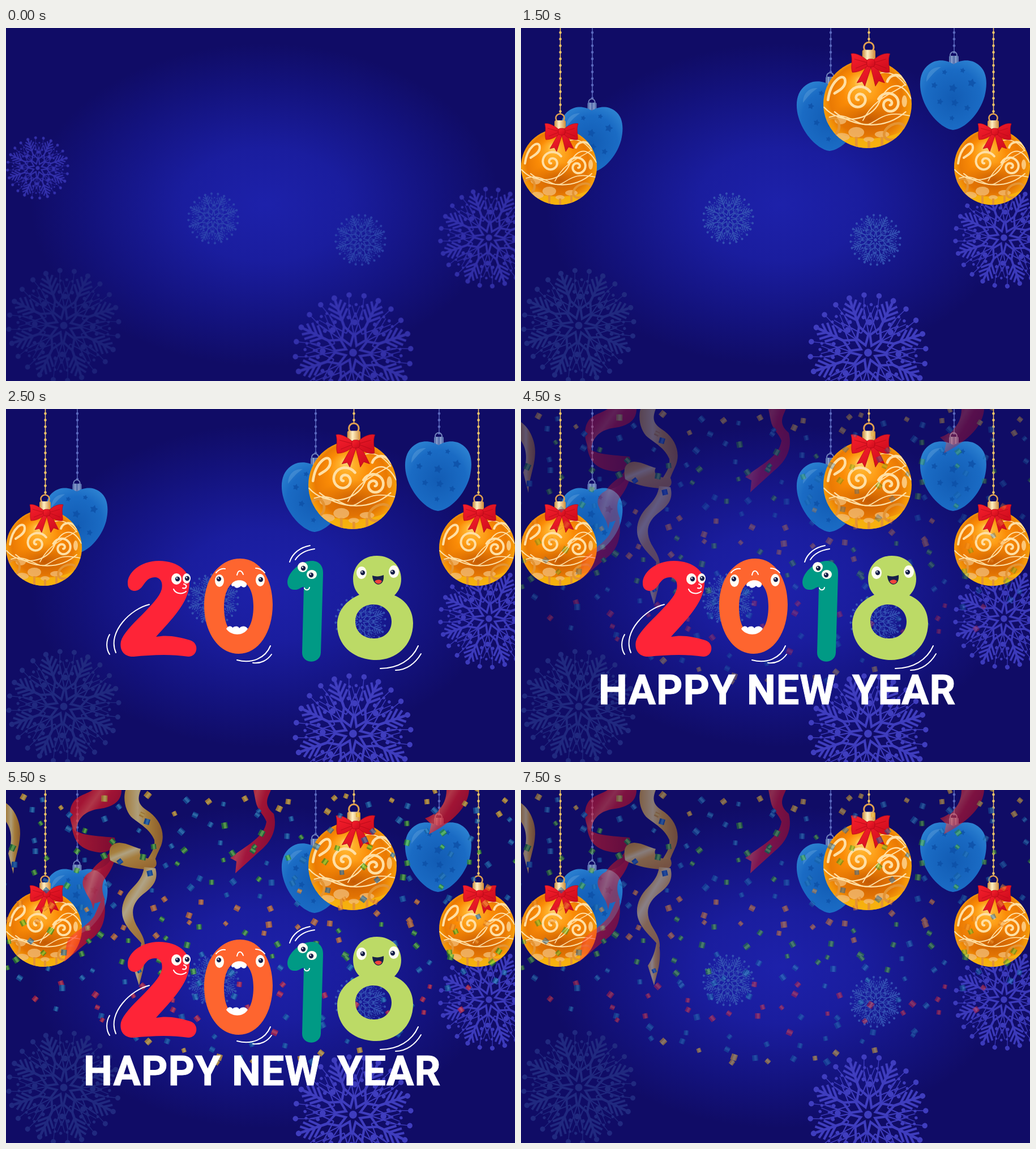
An HTML page for the animation above (8 s loop, 899 px wide and 623 px high).

```html
<!DOCTYPE html>
<html lang="en">
<head>
<meta charset="utf-8">
<title>Happy New Year</title>
<style>
  html, body { margin: 0; width: 100%; height: 100%; overflow: hidden; background: #100c64; }
  svg { display: block; width: 899px; height: 623px; }
  #greeting { font: 700 72px Roboto, sans-serif; letter-spacing: 1px; fill: #fff; stroke: #fff; }
  .line { fill: none; stroke: #fff; stroke-width: 2; stroke-linecap: round; }
  .red { fill: url(#red); }
  .redBack { fill: url(#redBack); }
  .gold { fill: url(#goldFoil); }
  .goldBack { fill: url(#goldBack); }
</style>
</head>
<body>
<svg viewBox="0 0 899 623">
  <defs>
    <radialGradient id="sky" gradientUnits="userSpaceOnUse" cx="0" cy="0" r="1" gradientTransform="translate(458 312) scale(415 285)">
      <stop stop-color="#1d21aa"/><stop offset=".35" stop-color="#1a1d9e"/>
      <stop offset=".75" stop-color="#13127c"/><stop offset="1" stop-color="#100c66"/>
    </radialGradient>
    <radialGradient id="ballFill" cx=".5" cy=".5" r=".52" fx=".42" fy=".22">
      <stop stop-color="#ffe08a"/><stop offset=".16" stop-color="#ffb02a"/>
      <stop offset=".45" stop-color="#fb8c06"/><stop offset=".78" stop-color="#ea7a04"/>
      <stop offset="1" stop-color="#f9a50c"/>
    </radialGradient>
    <radialGradient id="ballShade">
      <stop stop-color="#b44c00" stop-opacity=".75"/><stop offset="1" stop-color="#c85c00" stop-opacity="0"/>
    </radialGradient>
    <radialGradient id="heartFill" cx=".5" cy=".55" r=".6">
      <stop stop-color="#125cb4"/><stop offset=".7" stop-color="#1a6bc4"/><stop offset="1" stop-color="#2b80d0"/>
    </radialGradient>
    <linearGradient id="cap">
      <stop stop-color="#c98a3c"/><stop offset=".4" stop-color="#fff0c4"/><stop offset="1" stop-color="#d08a35"/>
    </linearGradient>
    <linearGradient id="bowFill" y2="1">
      <stop stop-color="#f8202c"/><stop offset="1" stop-color="#cc0a1c"/>
    </linearGradient>
    <linearGradient id="red" y2=".6">
      <stop stop-color="#d00c18"/><stop offset=".3" stop-color="#ee1a1c"/><stop offset=".45" stop-color="#ff4c3a"/>
      <stop offset=".6" stop-color="#ea181c"/><stop offset="1" stop-color="#c00a16"/>
    </linearGradient>
    <linearGradient id="redBack">
      <stop stop-color="#f0201c"/><stop offset="1" stop-color="#b40c18"/>
    </linearGradient>
    <linearGradient id="goldFoil" x2=".7" y2="1">
      <stop stop-color="#d8940e"/><stop offset=".3" stop-color="#f4bc2c"/><stop offset=".42" stop-color="#ffec8c"/>
      <stop offset=".6" stop-color="#f0b526"/><stop offset="1" stop-color="#d8940e"/>
    </linearGradient>
    <linearGradient id="goldBack">
      <stop stop-color="#eeb428"/><stop offset=".35" stop-color="#ffe884"/><stop offset=".6" stop-color="#f0b424"/>
      <stop offset="1" stop-color="#c8840e"/>
    </linearGradient>
    <clipPath id="round"><circle r="67"/></clipPath>

    <g id="arm" fill="currentColor" stroke="currentColor">
      <path d="M0-13L10-28L0-46L-10-28Z" fill="none" stroke-width="4"/>
      <path d="M0-44V-92" stroke-width="4.5"/>
      <path d="M-15-73L0-57L15-73M-15-83L0-67L15-83M-10-90L0-77L10-90" fill="none" stroke-width="4"/>
      <path d="M0-34L26-62M0-34L-26-62M11-27L17-70M-11-27L-17-70" stroke-width="2"/>
      <path d="M13-60L25-93M-13-60L-25-93M22-54L36-70M-22-54L-36-70" stroke-width="1.3"/>
      <g stroke="none">
        <circle cy="-96" r="4.7"/><circle cx="25" cy="-93" r="4.5"/><circle cx="-25" cy="-93" r="4.5"/>
        <circle cx="19" cy="-47" r="5"/><circle cx="12" cy="-58" r="3.2"/><circle cx="-12" cy="-58" r="3.2"/>
        <circle cx="31" cy="-74" r="2.6"/><circle cx="20" cy="-76" r="2.4"/><circle cx="-20" cy="-76" r="2.4"/>
      </g>
    </g>
    <g id="flake"><circle r="6.5" fill="currentColor"/></g>

    <g id="ball">
      <circle cx="2" cy="-86" r="7.5" fill="none" stroke="#e0a050" stroke-width="2.6"/>
      <rect x="-8" y="-82" width="20" height="20" rx="3" fill="url(#cap)"/>
      <circle r="67" fill="url(#ballFill)"/>
      <g clip-path="url(#round)">
        <ellipse cx="2" cy="24" rx="56" ry="32" fill="url(#ballShade)"/>
        <path d="M-62 36C-30 58 30 58 62 36L50 70H-50Z" fill="#f8b810" opacity=".8"/>
        <g fill="#f2bb72" opacity=".8">
          <ellipse cx="-41" cy="25" rx="9" ry="6"/><ellipse cx="-17" cy="43" rx="12" ry="8"/>
          <ellipse cx="-39" cy="50" rx="12" ry="6"/><ellipse cx="22" cy="46" rx="11" ry="5"/>
          <ellipse cx="2" cy="54" rx="8" ry="4"/>
        </g>
        <g fill="none" stroke="#e49433" stroke-width="4">
          <ellipse cx="41" cy="42" rx="17" ry="11" transform="rotate(-28 41 42)"/>
          <ellipse cx="-53" cy="34" rx="10" ry="13"/><path d="M-17 50V68M2 56V68M22 50V68"/>
        </g>
        <g id="swirls" fill="none" stroke="#ffdfa4" stroke-width="4" stroke-linecap="round">
          <path d="M-60-6C-56-36-36-48-34-36S-48-18-50-16M58-34C50-48 34-46 30-34"/>
          <path d="M-66 5C-40 34 6 25 18-3S50-38 66-8M-50 12C-24 34 24 42 58 12" stroke-width="2"/>
          <path d="M-7 25C12-12 44-18 58-30M-58 20C-28 10-12 38 4 30S28 10 64 18M14-44C30-54 48-42 58-28" stroke-width="1.6"/>
        </g>
        <ellipse cx="56" cy="-4" rx="4" ry="9" fill="#ffd895" opacity=".8"/>
      </g>
      <g fill="url(#bowFill)" stroke="#b30918" stroke-width=".7">
        <path d="M0-60L-16-32L-8-34L-4-27L6-58ZM4-60L12-27L17-35L26-32L12-60Z"/>
        <path d="M4-62C-8-74-20-78-25-76C-22-66-26-56-23-48C-12-48-2-54 4-62ZM5-62C14-74 28-78 34-76C30-66 34-56 33-48C22-46 10-54 5-62Z"/>
        <path d="M-20-68L2-62L-18-54M28-68L8-62L29-54" fill="none"/>
        <rect x="-1" y="-68" width="12" height="12" rx="4"/>
      </g>
    </g>

    <g id="heart">
      <circle cy="-13" r="6" fill="none" stroke="#7383bd" stroke-width="2"/>
      <rect x="-8" y="-12" width="17" height="15" rx="2" fill="#6079b4"/>
      <path d="M-3-12V2M4-12V2" stroke="#8fa3cf" stroke-width="2"/>
      <path d="M0 3C-12-5-30-7-43 3C-60 15-62 38-56 59C-47 91-20 117-1 119C20 117 46 91 55 59C60 38 60 15 43 3C30-7 12-5 0 3Z" fill="url(#heartFill)"/>
      <path d="M-48 34C-48 16-36 7-22 8C-34 16-40 24-48 34Z" fill="#6fabe0" opacity=".35"/>
      <g id="stars" fill="#0c4fa6" opacity=".75"></g>
    </g>
  </defs>

  <rect width="899" height="623" fill="url(#sky)"/>
  <g id="flakes"></g>
  <g id="ornaments"></g>

  <g id="party">
    <path class="redBack" d="M190 92C186 125 150 125 146 158C146 176 150 186 158 200L175 194C166 172 170 160 184 138C194 122 194 106 190 92Z"/>
    <path class="redBack" d="M116 62C122 80 150 80 192 84C196 98 184 112 163 110C138 106 120 98 116 62Z"/>
    <path class="red" d="M153 0H204C204 22 186 31 160 34C140 38 124 50 124 76C110 58 108 26 126 14C134 8 146 5 153 0Z"/>
    <path class="red" d="M190 96C192 126 174 138 156 142C136 148 132 162 138 174C144 190 152 194 154 212C158 190 164 176 172 160C190 138 198 116 190 96Z"/>
    <path class="red" d="M172 186C178 214 176 244 152 262L103 303C106 292 104 276 110 264C118 252 144 240 156 222Z"/>
    <path class="goldBack" d="M211 0H238C230 20 236 28 252 38C272 52 282 76 274 98C268 112 262 122 260 138L244 134C252 116 264 106 262 88C254 70 240 62 224 50C212 40 206 18 211 0Z"/>
    <path class="gold" d="M184 124C180 104 184 94 200 93C216 94 228 102 238 104C232 116 244 122 264 122C270 136 260 142 244 140C218 138 198 132 184 124Z"/>
    <path class="gold" d="M244 136L264 138C270 160 258 172 242 184C222 200 220 218 230 238C238 252 246 262 245 278C236 264 216 250 208 230C200 210 208 188 224 172C236 160 242 150 244 136Z"/>
    <path class="goldBack" d="M240 262C248 278 246 302 242 318L235 345L224 310C232 298 238 284 240 262Z"/>
    <path class="goldBack" d="M0 23C16 34 26 58 25 78C24 104 14 122 13 148L4 112C12 90 10 70 0 56Z"/>
    <path class="red" d="M437 0H468C462 14 454 26 473 42C480 70 468 92 448 108L405 147L407 126L396 120C424 98 456 84 460 56C456 44 444 36 441 20Z"/>
    <path class="red" d="M778 0H818C816 30 790 56 747 78L751 60L740 50C764 42 778 24 778 0Z"/>
    <g id="confetti"></g>
  </g>

  <g id="digits">
    <path fill="#fe2437" d="M215 308C214 290 236 268 270 268C305 268 326 288 324 310C322 342 292 372 265 402C285 398 305 402 325 408C342 413 339 437 322 437C290 432 255 434 226 437C208 438 200 425 203 410C210 384 268 345 275 318C279 300 266 292 252 300C243 306 240 321 227 321C220 321 215 316 215 308Z"/>
    <path fill="#fe652f" fill-rule="evenodd" d="M414 264C450 264 471 302 471 345C471 394 446 432 411 432C374 432 350 392 350 347C350 300 376 264 414 264ZM411 304C394 304 385 324 385 350C385 378 394 397 410 397C427 397 437 378 437 348C437 322 428 304 411 304Z"/>
    <path fill="#009a85" d="M497 305C498 288 520 268 540 268C554 268 561 278 560 292L556 430C555 451 523 451 523 430L526 314C520 314 518 320 508 319C500 318 497 312 497 305Z"/>
    <path fill="#bcda66" fill-rule="evenodd" d="M655 259C681 259 698 277 698 300C698 313 693 322 686 329C706 337 719 355 719 378C719 418 688 443 654 443C616 443 585 419 585 381C585 357 600 338 624 328C617 321 613 312 613 300C613 277 630 259 655 259ZM649 345C630 345 617 358 617 375C617 393 631 405 650 405C668 405 681 393 681 375C681 358 667 345 649 345Z"/>
    <path fill="#fff" d="M398 310C402 300 420 300 425 308C426 316 418 316 415 312C411 317 404 317 403 312C400 314 398 312 398 310ZM389 388C392 382 398 382 400 386C405 382 411 383 412 387C417 381 425 384 427 388C419 401 398 401 389 388Z"/>
    <path fill="#17204a" d="M647 294C653 296 660 296 667 293C669 315 648 315 647 294Z"/>
    <path fill="#f0443c" d="M651 304C656 300 662 301 664 304C661 310 655 310 651 304Z"/>
    <g id="eyes"></g>
    <g class="line">
      <path d="M314 309C321 311 319 318 312 316M296 318C300 327 312 327 318 322M408 293C410 283 416 284 419 292M371 289C376 283 381 281 387 282M441 281C448 281 453 284 457 289M527 316C529 321 535 320 536 315"/>
      <path d="M253 345C222 352 178 393 194 430M183 398C176 410 177 424 183 433M408 443C434 450 458 440 467 418M436 448C450 450 462 443 469 433M501 270C506 254 520 244 537 241M511 266C518 255 530 249 545 247M661 458C692 458 717 443 728 418M688 461C707 461 723 449 733 432"/>
    </g>
  </g>

  <g id="greeting">
    <text x="137" y="521">HAPPY</text><text x="399" y="521">NEW</text><text x="585" y="521">YEAR</text>
  </g>
</svg>

<script>
const $ = id => document.getElementById(id);
const add = (id, markup) => $(id).insertAdjacentHTML('beforeend', markup);
const place = (id, x, y, scale, extra = '') =>
  `<use href="#${id}" transform="translate(${x} ${y}) scale(${scale}) ${extra}"/>`;

// Snowflakes: eight turned arms each
for (let i = 0; i < 8; i++) add('flake', `<use href="#arm" transform="rotate(${i * 45})"/>`);
[[56, 247, 56, '#403ec4'], [366, 336, 46, '#3350b2'], [626, 374, 46, '#3350b2'],
 [853, 370, 90, '#3c3abb'], [102, 525, 102, '#20297f'], [613, 573, 107, '#3f3dbe']]
  .forEach(([x, y, r, color]) =>
    add('flakes', `<g color="${color}">${place('flake', x, y, r / 101, 'rotate(-19)')}</g>`));

// Ornaments
function spiral(cx, cy, radius, start, dir) {
  let d = '';
  for (let a = 0; a <= 10; a += .25) {
    const r = 2 + (radius - 2) * a / 10, w = start + dir * a;
    d += (d ? 'L' : 'M') + (cx + r * Math.cos(w)).toFixed(1) + ' ' + (cy + r * Math.sin(w)).toFixed(1);
  }
  return `<path d="${d}"/>`;
}
add('swirls', spiral(-13, -8, 20, 2, 1) + spiral(33, 0, 18, 1, -1));

function star(x, y, r) {
  const points = [...Array(10)].map((_, i) => {
    const a = i * Math.PI / 5 - 1.3, k = i % 2 ? r * .55 : r;
    return `${(x + k * Math.cos(a)).toFixed(1)},${(y + k * Math.sin(a)).toFixed(1)}`;
  });
  return `<polygon points="${points.join(' ')}"/>`;
}
add('stars', star(-1, 45, 8) + star(32, 36, 8) + star(-34, 40, 6) + star(2, 71, 7) +
  star(-24, 69, 6) + star(24, 80, 6) + star(-3, 98, 5) + star(-16, 17, 5) + star(16, 14, 5));

const chain = (x, end, color) =>
  `<g stroke="${color}"><path d="M${x} 0V${end}" stroke-width="1.5"/>
   <path d="M${x} 8V${end}" stroke-width="4.6" stroke-linecap="round" stroke-dasharray="0 11.6"/></g>`;
[[126, 143, .94], [547, 98, 1], [765, 61, 1]].forEach(([x, y, s]) =>
  add('ornaments', chain(x, y - 18, '#5a68bd') + place('heart', x - 1, y, s)));
[[67, 245, 1], [612, 134, 1.164], [832, 245, 1]].forEach(([x, y, s]) =>
  add('ornaments', chain(x + 2.5, y - 93 * s, '#f5c768') + place('ball', x, y, s)));

// Eyes: centre, radii, pupil offset
[[301, 300, 9, 10, 2, 0], [319, 299, 7, 9, 1, 0], [377, 303, 8, 11, -1, -3], [449, 302, 8, 11, 1, -1],
 [524, 279, 9, 9, 1, 2], [540, 292, 9, 8, -1, 1], [628, 289, 9, 11, 2, 0], [685, 287, 9, 11, -2, 1]]
  .forEach(([x, y, rx, ry, dx, dy]) => add('eyes',
    `<ellipse cx="${x}" cy="${y}" rx="${rx}" ry="${ry}" fill="#fffdf2"/>
     <circle cx="${x + dx}" cy="${y + dy}" r="4.2" fill="#17204a"/>
     <circle cx="${x + dx - 1.2}" cy="${y + dy - 1.5}" r="1.2" fill="#fff"/>`));

// Confetti: evenly scattered slips, hanging lower in the middle
const tones = [['#155f9f', '#3d93c4'], ['#2b8c22', '#79d53a'], ['#155f9f', '#2f7db8'], ['#d9761c', '#f5a13a'],
  ['#2b8c22', '#79d53a'], ['#155f9f', '#3d93c4'], ['#c4213c', '#ea5148'], ['#155f9f', '#2f7db8'], ['#e3a81c', '#f9d548']];
let slips = '';
for (let i = 1; i < 345; i++) {
  const x = i * .7548777 % 1 * 899 + 9 * Math.sin(i * i), y = i * .5698403 % 1 * 492 + 9 * Math.cos(i * i * 3);
  if (y > 345 + 145 * Math.sin(Math.PI * x / 899)) continue;
  const [dark, light] = tones[(i * 5 + (i >> 3)) % tones.length], size = .8 + i * .377 % .4;
  slips += `<g transform="translate(${x.toFixed(1)} ${y.toFixed(1)}) rotate(${i * 47 % 120 - 60}) scale(${size.toFixed(2)})">
    <path d="M-5-4L4-5L5 4L-4 5Z" fill="${dark}"/><path d="M-2-4.4L2-4.8L3 4.2L-1 4.6Z" fill="${light}"/></g>`;
}
add('confetti', slips);

// Opacity of each layer in each step
const layers = {
  flakes:    [.75, 1, 1, 1, 1, 1, 1, 1, 1],
  ornaments: [0, .5, 1, 1, 1, 1, 1, 1, 1],
  digits:    [0, 0, 0, 1, 1, 1, 1, 1, 0],
  greeting:  [0, 0, 0, 0, 1, 1, 1, 1, 0],
  party:     [0, 0, 0, 0, 0, .33, .67, 1, .5]
};
const began = performance.now();
function draw() {
  const step = Math.floor(((performance.now() - began) % 8000 + 500) / 1000);
  for (const id in layers) $(id).setAttribute('opacity', layers[id][step]);
  requestAnimationFrame(draw);
}
draw();
</script>
</body>
</html>
```
